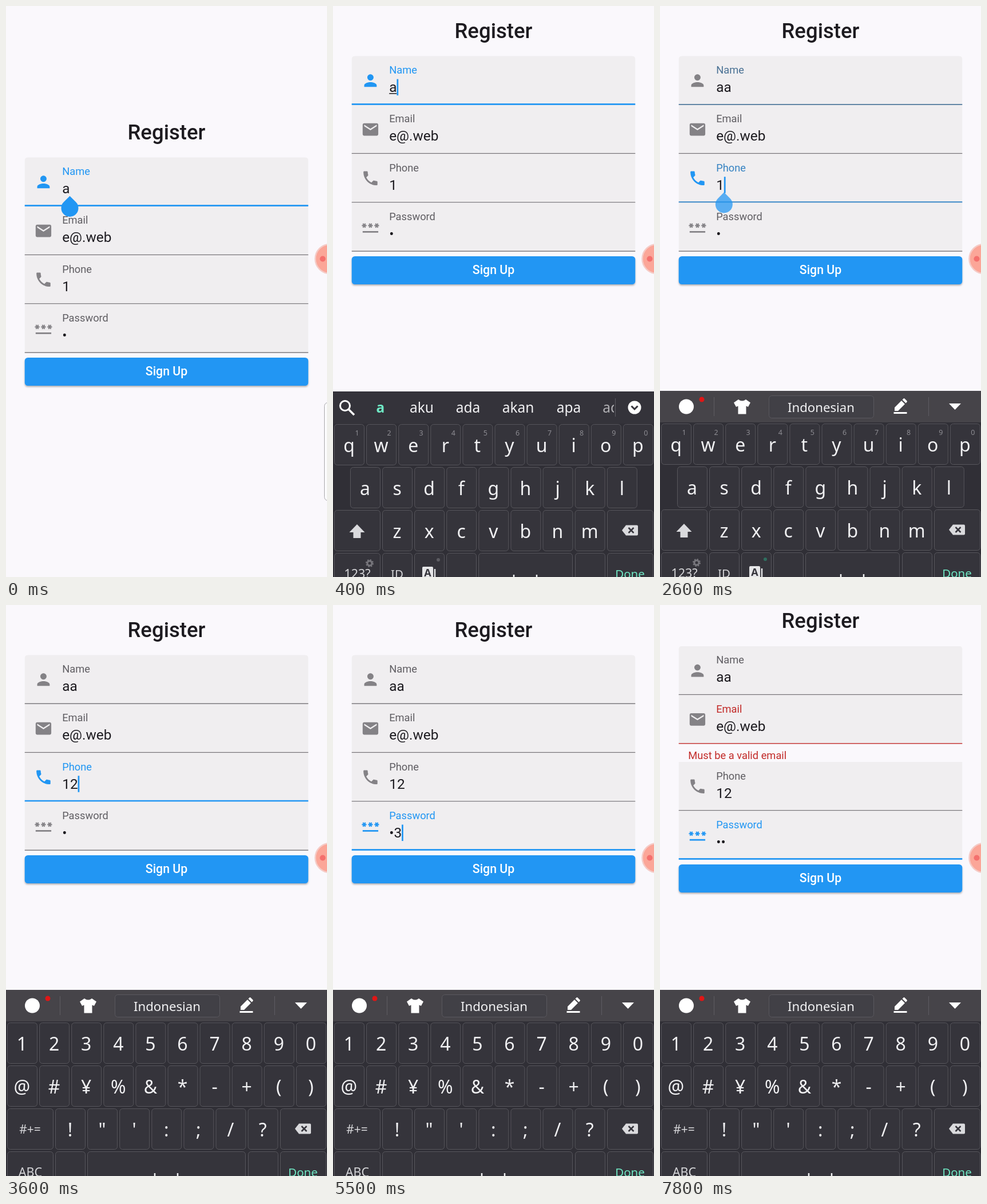
An HTML page that plays this animation: 561x997 px, repeating every 8 s.

```html
<!DOCTYPE html>
<html lang="en">
<head>
<meta charset="utf-8">
<title>Register form</title>
<style>
html, body { margin: 0; width: 100%; height: 100%; overflow: hidden; background: #faf8fc; }
svg { display: block; width: 100vw; height: 100vh; }
text { white-space: pre; }
.app { font-family: Roboto, sans-serif; }
.keys { font-family: "Noto Sans", "Open Sans", sans-serif; }
</style>
</head>
<body>
<svg id="stage" viewBox="0 0 561 997"></svg>
<script>
const LOOP = 8000, STEP = 100;
const BLUE = '#2196f3', INK = '#1d1b20', LABEL = '#605e63', ICON = '#848286', RED = '#c22a28', PALE = '#f1f1f3';
const DP = 561 / 411.4; // pixels per layout unit
const LEFT = 24 * DP, WIDTH = 561 - 2 * LEFT, ROW = 85.3, TEXT_X = 72 * DP;
const KEYBOARD_TOP = 672, KEYBOARD_HEIGHT = 354;

const ICONS = {
  person: 'M12 12c2.21 0 4-1.79 4-4s-1.79-4-4-4-4 1.79-4 4 1.79 4 4 4zm0 2c-2.67 0-8 1.34-8 4v2h16v-2c0-2.66-5.33-4-8-4z',
  mail: 'M20 4H4c-1.1 0-2 .9-2 2v12c0 1.1.9 2 2 2h16c1.1 0 2-.9 2-2V6c0-1.1-.9-2-2-2zm0 4l-8 5-8-5V6l8 5 8-5v2z',
  phone: 'M6.62 10.79c1.44 2.83 3.76 5.14 6.59 6.59l2.2-2.2c.27-.27.67-.36 1.02-.24 1.12.37 2.33.57 3.57.57.55 0 1 .45 1 1V20c0 .55-.45 1-1 1C10.61 21 3 13.39 3 4c0-.55.45-1 1-1h3.5c.55 0 1 .45 1 1 0 1.25.2 2.45.57 3.57.11.35.03.74-.25 1.02z'
};
const STAR = 'l.85-1.48.85 1.48 1.3-.75-.85-1.48h1.7v-1.5h-1.7l.85-1.47-1.3-.75-.85 1.47-.85-1.47-1.3.75.85 1.47h-1.7v1.5h1.7l-.85 1.48z';
ICONS.password = 'M2 17h20v2H2z' + [3.15, 11.15, 19.15].map(x => `M${x} 12.95${STAR}`).join('');

const clamp = v => Math.min(1, Math.max(0, v));
const progress = (t, start, length) => clamp((t - start) / length);
const fastOutSlowIn = p => 1 - (1 - p ** 1.7) ** 3;
const within = (t, spans) => spans.some(([a, b]) => t >= a && t < b);

function mix(a, b, p) {
  const channel = (c, i) => parseInt(c.slice(i, i + 2), 16);
  return `rgb(${[1, 3, 5].map(i => Math.round(channel(a, i) + (channel(b, i) - channel(a, i)) * p))})`;
}
const rect = (x, y, w, h, fill, r = 0, more = '') =>
  `<rect x="${x}" y="${y}" width="${w}" height="${h}" rx="${r}" fill="${fill}" ${more}/>`;
const circle = (x, y, r, fill, more = '') => `<circle cx="${x}" cy="${y}" r="${r}" fill="${fill}" ${more}/>`;
const path = (d, fill, more = '') => `<path d="${d}" fill="${fill}" ${more}/>`;
const stroke = (d, color, width) => path(d, 'none', `stroke="${color}" stroke-width="${width}"`);
const text = (s, x, y, size, fill, more = '') =>
  `<text x="${x}" y="${y}" font-size="${size}" fill="${fill}" ${more}>${s.replace(/&/g, '&amp;')}</text>`;
const centered = (s, x, y, size, fill, more = '') => text(s, x, y, size, fill, 'text-anchor="middle" ' + more);
const group = (y, body, cls) => `<g class="${cls}" transform="translate(0 ${y})">${body}</g>`;

// Form

const FOCUS = [[-1000, 2490], null, [2490, 4120], [4120, 9000]];
const CURSOR = [[200, 1100], [1600, 2300], [2500, 3100], [3600, 4100], [4200, 4700], [5100, 5700], [6200, 6700], [7300, 7800]];
const HANDLE = [[-200, 200], [2490, 3600], [4120, 5100]];
const SECOND_LETTER = 1800, SECOND_DIGIT = 3600, SECRET_DIGIT = 5100;

function fields(t) {
  const password = t < SECRET_DIGIT ? '•' : t < 6700 ? '•3' : '••';
  return [
    { label: 'Name', icon: 'person', value: t < SECOND_LETTER ? 'a' : 'aa', end: t < SECOND_LETTER ? 13.3 : 26.5 },
    { label: 'Email', icon: 'mail', value: 'e@.web' },
    { label: 'Phone', icon: 'phone', value: t < SECOND_DIGIT ? '1' : '12', end: t < SECOND_DIGIT ? 13.7 : 27.4 },
    { label: 'Password', icon: 'password', value: password, end: { '•': 8.2, '•3': 21.9, '••': 16.4 }[password] }
  ];
}

function field(f, i, top, t, error) {
  const span = FOCUS[i];
  const active = span && within(t, [span]);
  const focus = span ? progress(t, span[0], 167) - progress(t, span[1], 167) : 0;
  const tint = i === 1 ? [RED, error] : [BLUE, focus];
  const weight = DP * (1 + focus);
  const corner = i ? 0 : 4 * DP;
  let out = path(`M${LEFT} ${top + ROW}v${corner - ROW}q0 ${-corner} ${corner} ${-corner}h${WIDTH - 2 * corner}q${corner} 0 ${corner} ${corner}v${ROW - corner}z`, '#f0eef0');
  out += rect(LEFT, top + ROW - weight, WIDTH, weight, mix('#737175', ...tint));
  out += path(ICONS[f.icon], active ? BLUE : ICON, `transform="translate(${LEFT + 12 * DP} ${top + ROW / 2 - 12 * DP}) scale(${DP})"`);
  out += text(f.label, TEXT_X, top + 30.5, 18.3, mix(LABEL, ...tint));
  out += text(f.value, TEXT_X, top + 62.4, 24.4, INK);
  if (i === 0 && active && t >= 200) out += rect(TEXT_X, top + 64.5, f.end, 1.5, INK);
  if (active && within(t, CURSOR)) out += rect(TEXT_X + f.end, top + 40, 2 * DP, 28.5, BLUE);
  return out;
}

function handle(f, top, t) {
  const shown = HANDLE.find(span => within(t, [span]));
  if (!shown) return '';
  const r = 11 * DP, k = r * Math.SQRT1_2;
  const d = `M0 ${-r * Math.SQRT2}L${k} ${-k}A${r} ${r} 0 1 1 ${-k} ${-k}z`;
  const alpha = progress(t, shown[0], 150);
  return path(d, BLUE, `opacity="${alpha}" transform="translate(${TEXT_X + f.end} ${top + 88.3})"`);
}

function button(top, t) {
  const height = 36 * DP, corner = 4 * DP;
  let out = rect(LEFT, top, WIDTH, height, BLUE, corner, 'filter="url(#shadow)"');
  if (t >= 7200 && t < 7600) {
    const radius = 209 + (t - 7200) * 1.8;
    const alpha = 0.24 * (1 - progress(t, 7300, 300));
    out += `<clipPath id="face">${rect(LEFT, top, WIDTH, height, '#fff', corner)}</clipPath>`;
    out += circle(205, top + height / 2, radius, '#fff', `opacity="${alpha}" clip-path="url(#face)"`);
  }
  return out + centered('Sign Up', 280.5, top + 31.5, 21.3, '#fff', 'font-weight="500"');
}

function form(t, rise) {
  const invalid = t >= 7200;
  const error = invalid ? progress(t, 7120, 167) : 0;
  const base = 264.6 - rise * KEYBOARD_HEIGHT / 2 - (invalid ? 15.7 : 0);
  const top = i => base + i * ROW + (invalid && i > 1 ? 31.6 : 0);
  const list = fields(t);
  const current = FOCUS.findIndex(span => span && within(t, [span]));
  let out = centered('Register', 280.5, base - 31.6, 36.5, INK, 'font-weight="500"');
  out += list.map((f, i) => field(f, i, top(i), t, error)).join('');
  if (invalid) out += text('Must be a valid email', 49.3, base + 197.3 - 6 * (1 - error), 18.3, RED, `opacity="${error}"`);
  out += button(top(4) + 6 * DP, t);
  return out + handle(list[current], top(current), t);
}

// Keyboard

const keyBox = (x, y, w = 52) => rect(x + .5, y + .5, w, 71, '#35343b', 5, 'stroke="#57565c"');
const column = i => i * 56.1;

function keyRow(chars, x, y, hints) {
  return [...chars].map((c, i) => {
    const left = x + column(i);
    return keyBox(left, y) + centered(c, left + 26, y + 49, 32, PALE) +
      (hints ? centered(String((i + 1) % 10), left + 40, y + 19.5, 12.5, '#8d8c92') : '');
  }).join('');
}

function suggestionBar(t) {
  const words = [t < SECOND_LETTER + 100 ? 'a' : 'aa', 'aku', 'ada', 'akan', 'apa', 'ac'];
  const spots = [83, 155, 236, 323.5, 412, 484];
  let out = rect(0, 0, 561, 56, '#34333a');
  out += circle(21, 25, 8.5, 'none', 'stroke="#fff" stroke-width="3"') + stroke('M27 31L37 41', '#fff', 3.5);
  out += '<clipPath id="bar"><rect width="491" height="56"/></clipPath><g clip-path="url(#bar)">';
  out += words.map((w, i) => centered(w, spots[i], 37, 24.5, i ? PALE : '#6fe8c4',
    i ? (i === 5 ? 'opacity=".65"' : '') : 'font-weight="600"')).join('');
  return out + '</g>' + rect(493, 12, 1, 32, '#5c5b61') + circle(527, 28, 11.5, '#fff') +
    stroke('M521.5 25.5l5.5 5.5 5.5-5.5', '#34333a', 3);
}

function toolBar() {
  const shirt = 'M137 15q6.5 5 13 0l8 5.5-4 7.5-3.5-1.5v14h-14v-14L133 28l-4-7.5z';
  return rect(0, 0, 561, 55, '#464449') + circle(46, 27.5, 13, '#fff') + circle(73, 15, 4.5, '#e01616') +
    [94, 469].map(x => rect(x, 11, 1, 33, '#5e5c62')).join('') + path(shirt, '#fff') +
    rect(190.5, 8.5, 183, 39, '#414046', 5, 'stroke="#5a585e"') +
    centered('Indonesian', 281.5, 36.5, 22.2, PALE) +
    path('M410 35v-6l12-12 6 6-12 12zM423.5 15.5l2-2q1-.8 2 0l4 4q.8 1 0 2l-2 2z', '#fff') + rect(408.5, 37, 23, 3, '#fff') +
    path('M505 22h21l-10.5 11z', '#fff');
}

function bottomRow(mode, settled) {
  const y = 282, baseline = y + 44;
  const spaceX = { text: 254, secret: 198, digits: 142 }[mode];
  const mid = (spaceX + 418) / 2;
  let out = keyBox(2, y, 80) + centered(mode === 'digits' ? 'ABC' : '123?', 42.5, baseline, 21.5, '#d6d6d9');
  for (let x = 86; x < spaceX - 4; x += 56) out += keyBox(x, y);
  out += keyBox(spaceX, y, 418 - spaceX) + keyBox(423, y) + keyBox(479, y, 80);
  out += stroke(`M${mid - 20} ${y + 38}v6.3h40v-6.3`, PALE, 2.5);
  out += centered('Done', 519, baseline, 20.5, '#6fe8c4');
  if (mode === 'digits') return out;
  out += centered('ID', 112, baseline, 20.5, '#d6d6d9');
  out += circle(64, y + 18, 4, 'none', 'stroke="#77767c" stroke-width="3"') +
    circle(64, y + 18, 6, 'none', 'stroke="#77767c" stroke-width="2" stroke-dasharray="2.4 2.3"');
  if (mode === 'text') {
    out += rect(156, y + 24, 19, 24, '#e6e6e8', 2) + stroke(`M178 ${y + 28}v20`, '#e6e6e8', 2.5) +
      centered('A', 165.5, y + 41, 18, '#35343b', 'font-weight="600"') +
      circle(184, y + 12, 3, settled ? '#2f6f60' : '#5e5d63');
  }
  return out;
}

const popup = (c, x, y) => rect(x - 33, y, 66, 68, '#4b4a51', 6) + centered(c, x, y + 47, 36, '#fff');
const pressed = (t, start) => within(t, [[start, start + 200]]);

function keyboard(t, settled) {
  const mode = within(t, [[3100, 4200], [4700, LOOP]]) ? 'digits' : t < 4200 ? 'text' : 'secret';
  const digits = mode === 'digits';
  let out = rect(0, 0, 561, KEYBOARD_HEIGHT, '#302f36') + (t < 2500 ? suggestionBar(t) : toolBar());
  out += digits
    ? keyRow('1234567890', 2, 57) + keyRow('@#¥%&*-+()', 2, 132) + keyRow('!"\':;/?', 86, 207)
    : keyRow('qwertyuiop', 2, 57, true) + keyRow('asdfghjkl', 30, 132) + keyRow('zxcvbnm', 86, 207);
  out += keyBox(2, 207, 80) + keyBox(479, 207, 80);
  out += digits ? centered('#+=', 42, 251, 21, '#d6d6d9') : path('M42 232l13.5 14H48.5v10h-13v-10H28.5z', '#dadadd');
  out += path('M505 242.5l7-9h19q2 0 2 2v14q0 2-2 2h-19z', '#dadadd') + stroke('M516.5 238l9 9m0-9l-9 9', '#35343b', 2.5);
  out += bottomRow(mode, settled);
  if (pressed(t, SECOND_LETTER)) out += popup('a', 56, 56);
  if (pressed(t, SECRET_DIGIT)) out += popup('3', 140, -20);
  return out;
}

// Stage

const DEFS = `<defs><filter id="shadow" x="-5%" y="-20%" width="110%" height="150%">
  <feDropShadow dx="0" dy="2" stdDeviation="1.4" flood-opacity=".3"/></filter></defs>`;

function render(t) {
  const rise = t < 100 ? 0 : fastOutSlowIn(progress(t, 50, 300));
  const settled = t >= 1400;
  const keyboardY = KEYBOARD_TOP + (1 - rise) * KEYBOARD_HEIGHT + (settled ? 0 : 1);
  let out = DEFS + rect(0, 0, 561, 997, '#faf8fc');
  out += group(0, form(t, rise), 'app');
  out += rect(556.5, 692.5, 20, 171, '#fbfbfc', 6, 'stroke="#a9a8ac"');
  if (rise > 0) out += group(keyboardY, keyboard(t, settled), 'keys');
  out += circle(566, 441.5, 25.5, '#fba698', 'stroke="#f5cbc6" stroke-width="2.5"') + circle(553.5, 441.5, 5, '#f4706d');
  return out;
}

const stage = document.getElementById('stage');
const begin = performance.now();
let shown = -1;

function tick() {
  const elapsed = (performance.now() - begin) % LOOP;
  const t = Math.floor(elapsed / STEP) * STEP;
  if (t !== shown) stage.innerHTML = render(shown = t);
  requestAnimationFrame(tick);
}
tick();
</script>
</body>
</html>
```
